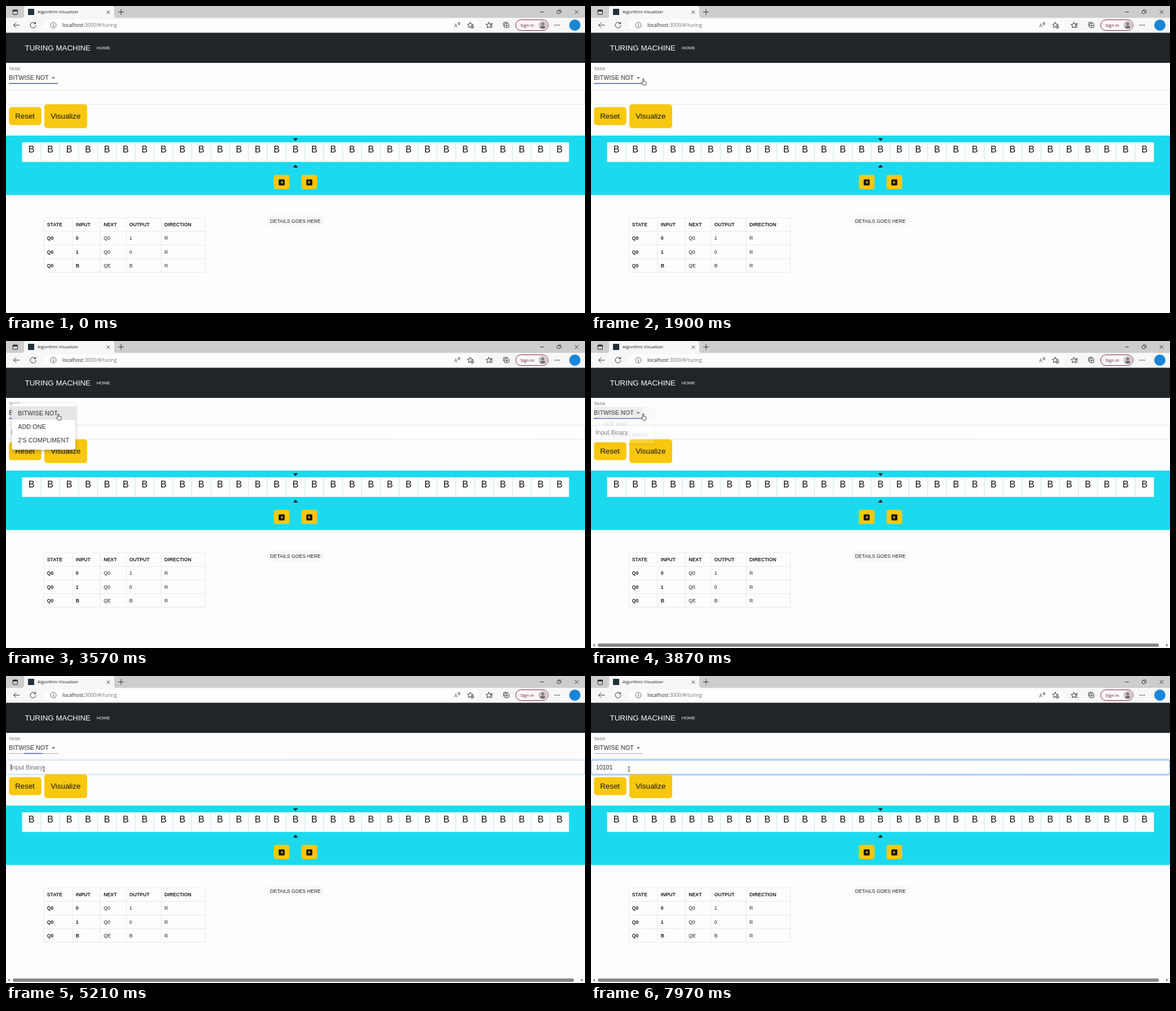
An HTML page that plays this animation: 1027 px wide and 545 px high, repeating every 8 s.

```html
<!DOCTYPE html>
<html lang="en">
<head>
<meta charset="utf-8">
<title>Turing machine</title>
<style>
  html, body { margin: 0; width: 100%; height: 100%; overflow: hidden; background: #fdfdfd; }
  svg { display: block; }
  text { font-family: "Liberation Sans", Arial, sans-serif; white-space: pre; }
  .ui { font-family: "Open Sans", "Noto Sans", sans-serif; }
  .icon { fill: none; stroke: #333; stroke-width: 1; stroke-linecap: round; stroke-linejoin: round; }
  .mui { letter-spacing: .1px; }
  #underline { transform-origin: 48.5px 137px; }
  #menu { transform-origin: 14px 122px; }
  #paper { filter: drop-shadow(0 3px 3px rgba(0, 0, 0, .25)); }
</style>
</head>
<body>
<svg id="stage" width="1027" height="545" viewBox="0 0 1027 545">
  <g id="chrome"></g>
  <g id="page"></g>
  <g id="scrollbar"></g>
  <g id="menu"></g>
  <g id="cursor">
    <path id="arrow" d="M0 0V10.4L2.5 8.2 4.1 11.6 5.6 10.9 4.1 7.6H7.2Z" fill="#fff" stroke="#222" stroke-width=".8"/>
    <path id="hand" d="M-1 1Q0-.6 1 1V5L4 5.5Q5.6 6 5.4 7.6L4.6 11.5H-.6L-3 7.6Q-3.2 6-1 7.2Z" fill="#fff" stroke="#222" stroke-width=".9" stroke-linejoin="round"/>
    <path id="beam" d="M-2-4H-.6L0-3.5 .6-4H2M0-3.5V3.5M-2 4H-.6L0 3.5 .6 4H2" fill="none" stroke="#222" stroke-width=".9"/>
  </g>
</svg>
<script>
const LOOP = 8000;
const INK = '#212529', YELLOW = '#f8c70f', CYAN = '#1bdaee';
const $ = id => document.getElementById(id);
let layer;

function add(tag, attrs, content = '') {
  const el = document.createElementNS('http://www.w3.org/2000/svg', tag);
  for (const key in attrs) el.setAttribute(key, attrs[key]);
  el.textContent = content;
  layer.appendChild(el);
  return el;
}
const rect = (x, y, width, height, fill, more) => add('rect', { x, y, width, height, fill, ...more });
const path = (d, more) => add('path', { d, ...more });
const icon = (d, more) => path(d, { class: 'icon', ...more });
const circle = (cx, cy, r, fill, more) => add('circle', { cx, cy, r, fill, ...more });
// Text is placed by its left edge and the middle of its capitals.
const label = (content, x, middle, size, fill = INK, more) =>
  add('text', { x, y: middle + size * .36, 'font-size': size, fill, ...more }, content);

function drawChrome() {
  layer = $('chrome');
  const ui = { class: 'ui' };
  rect(0, 0, 1027, 22, '#cdcdcd');
  rect(0, 21, 1027, 26.5, '#f7f7f7');
  path('M28 21Q32 21 32 17V4Q32 0 36 0H188Q192 0 192 4V17Q192 21 196 21Z', { fill: '#f7f7f7' });
  rect(12, 7, 8.5, 8, 'none', { rx: 1.5, stroke: '#222' });
  rect(12, 7, 8.5, 2.5, '#222');
  rect(39, 5, 11, 11, '#20323a');
  label('Algorithm Visualizer', 56, 10.5, 7.8, '#222', ui);
  icon('M179 8.5L184 13.5M184 8.5L179 13.5');
  icon('M199.5 10.5H208.5M204 6V15');
  icon('M947.5 10.5H953.5');
  rect(977.5, 8.5, 5, 5, 'none', { rx: 1, stroke: '#333' });
  icon('M979.5 7H983Q984.5 7 984.5 8.5V12');
  icon('M1009 7.5L1015 13.5M1015 7.5L1009 13.5');

  icon('M24 34H13.5M18 29.5L13.5 34 18 38.5');
  icon('M52 31A5 5 0 1 0 53 34.5M52.5 28.5V31.5H49.5');
  rect(67, 24, 773, 20, '#fefefe', { rx: 10 });
  circle(84, 34, 5, 'none', { stroke: '#555', 'stroke-width': .9 });
  icon('M84 33.5V36.5M84 31.5V31.6');
  const url = label('localhost', 100, 34, 8.9, '#222', ui);
  const rest = add('tspan', { fill: '#707070' }, ':3000/#/turing');
  url.appendChild(rest);
  label('A', 795, 34.5, 9, '#555', ui);
  icon('M802 29.5Q803.5 31 802 33M804 28.5Q806 31 804 34', { 'stroke-width': .8 });
  const star = 'l1.5 3.2 3.5.5-2.6 2.4.7 3.5-3.1-1.7-3.1 1.7.7-3.5-2.6-2.4 3.5-.5Z';
  icon('M823.5 28.8' + star);
  circle(827, 37, 2.8, '#fefefe', { stroke: '#333', 'stroke-width': .8 });
  icon('M825.8 37H828.2M827 35.8V38.2', { 'stroke-width': .7 });
  icon('M856.5 29' + star);
  icon('M860 31.5H863M861 34.5H863M860.5 37.5H863');
  rect(884.5, 31, 7.5, 7.5, '#f7f7f7', { rx: 1.5, class: 'icon' });
  icon('M882.5 36V30.5Q882.5 29 884 29H889.5M886.5 34.8H890M888.2 33V36.6');
  rect(904, 24.5, 57.5, 19, '#fbf8f9', { rx: 9.5, stroke: '#842743' });
  label('Sign in', 912.5, 34, 7.9, '#5e1c30', ui);
  circle(952, 34, 7.5, '#c9c5c3');
  circle(952, 31.8, 2.4, '#77716e');
  path('M947.5 38.5Q947.5 35 952 35T956.5 38.5Q952 41.5 947.5 38.5', { fill: '#77716e' });
  for (const x of [974, 977.5, 981]) circle(x, 34, .9, '#333');
  circle(1009, 34, 10, '#1a86d8');
}

function drawPage() {
  layer = $('page');
  rect(0, 47.5, 1027, 53.5, '#1f2529');
  label('TURING MACHINE', 33.5, 74, 13.37, '#fff');
  label('HOME', 160.8, 74.2, 8.02, '#f4f4f4');

  label('TASK', 5.2, 111.6, 8.02, '#6b6b6b', { class: 'mui' });
  rect(5.3, 117, 86.7, 21, '#efeff1', { id: 'focusFill', rx: 1 });
  label('BITWISE NOT', 5.3, 127.3, 10.7, '#2b2b2b', { class: 'mui' });
  path('M80.7 126.3H87.3L84 129.7Z', { fill: '#757575' });
  rect(5.3, 137.3, 86.7, .8, '#8f8f8f');
  rect(5.3, 136.8, 86.7, 1.4, '#3f51b5', { id: 'underline' });

  rect(.5, 149.5, 1026, 24.8, '#fefefe', { rx: 3.5, stroke: '#dee2e8', 'stroke-width': .9 });
  layer = add('g', { id: 'ring' });
  rect(-.9, 148, 1028.8, 27.8, 'none', { rx: 5, stroke: '#c2dbfe', 'stroke-width': 2.7 });
  rect(.5, 149.5, 1026, 24.8, 'none', { rx: 3.5, stroke: '#86b7fe' });
  layer = $('page');
  label('Input Binary', 8.5, 162, 10.7, '#646b72', { id: 'placeholder' });
  label('10101', 8.7, 162, 10.7, INK, { id: 'typed' });
  rect(8.4, 156.5, .9, 11, '#111', { id: 'caretStart' });
  rect(38.6, 156.5, .9, 11, '#111', { id: 'caretEnd' });

  rect(5.3, 179.5, 57.4, 32, YELLOW, { rx: 5 });
  label('Reset', 16.2, 195.5, 13.37, '#111');
  rect(68, 174.5, 76, 42.3, YELLOW, { rx: 5 });
  label('Visualize', 79.2, 195.5, 13.37, '#111');

  drawTape();
  drawTable();
  rect(463, 372, 101, 20, '#f7f8f9', { rx: 6 });
  label('DETAILS GOES HERE', 468.6, 382.2, 8.69);
}

function drawTape() {
  const count = 29, left = 28.5, step = 33.45;
  rect(0, 230, 1027, 105.5, CYAN);
  rect(left, 242, count * step, 34.8, '#fdfdfd');
  for (let i = 0; i < count; i++) {
    if (i) rect(left + i * step - .4, 242, .8, 34.8, '#b9dfe6');
    label('B', left + (i + .5) * step, 254.6, 16.05, '#111', { 'text-anchor': 'middle' });
  }
  path('M509 234.8H518L513.5 239.8Z', { fill: INK });
  path('M509 286.8H518L513.5 281.4Z', { fill: INK });
  for (const [x, side] of [[489, -1], [538, 1]]) {
    rect(x - 14, 299.7, 28, 25.3, YELLOW, { rx: 4 });
    rect(x - 5.3, 307.8, 10.6, 10.6, '#111', { rx: 1.5 });
    path(`M${x + side * 2} 313.1L${x - side * 1.6} 310.4V315.8Z`, { fill: YELLOW });
  }
}

function drawTable() {
  const columns = [67, 118, 167.5, 213, 275.3, 353.5];
  const rows = ['STATE INPUT NEXT OUTPUT DIRECTION', 'Q0 0 Q0 1 R', 'Q0 1 Q0 0 R', 'Q0 B QE B R'];
  const top = 376, height = 24.15, bottom = top + rows.length * height;
  for (const x of columns) rect(x - .4, top, .8, bottom - top, '#e1e3e5');
  for (let r = 0; r <= rows.length; r++) rect(67, top + r * height - .4, 286.5, .8, '#e1e3e5');
  rows.forEach((row, r) => row.split(' ').forEach((cell, c) =>
    label(cell, columns[c] + 5.8, top + (r + .5) * height, 8.69, '#1d2023',
      { 'font-weight': r && c > 1 ? 400 : 700 })));
}

function drawScrollbar() {
  layer = $('scrollbar');
  rect(12, 537, 995.5, 6, '#868686', { rx: 3 });
  path('M7 537.2V542.8L3 540Z', { fill: '#868686' });
  path('M1020 537.2V542.8L1024 540Z', { fill: '#868686' });
}

function drawMenu() {
  layer = $('menu');
  rect(10.5, 111, 112.5, 82, '#fff', { id: 'paper', rx: 2.7 });
  rect(10.5, 116, 112.5, 24, '#e6e6e6');
  ['BITWISE NOT', 'ADD ONE', "2'S COMPLIMENT"].forEach((item, i) =>
    label(item, 21.3, 128.2 + i * 24, 10.7, '#2b2b2b', { class: 'mui' }));
}

// Steps are [time, value, easing towards the next step]; values hold at both ends.
function play(id, property, steps) {
  const frames = steps.map(([time, value, easing = 'linear']) =>
    ({ offset: time / LOOP, [property]: value, easing }));
  frames.unshift({ ...frames[0], offset: 0, easing: 'linear' });
  frames.push({ ...frames[frames.length - 1], offset: 1 });
  $(id).animate(frames, { duration: LOOP, iterations: Infinity });
}
// Visible only within the given [from, to] spans.
function show(id, ...spans) {
  const steps = [[0, 0, 'step-end']];
  for (const [from, to] of spans) steps.push([from, 1, 'step-end'], [to, 0, 'step-end']);
  play(id, 'opacity', steps);
}

drawChrome();
drawPage();
drawScrollbar();
drawMenu();

const STANDARD = 'cubic-bezier(.4, 0, .2, 1)';
const OPEN = 2470, CLOSE = 3736, FOCUS = 5155, TYPE = 6140;
const GROW = 251, SCALE = 167;
const SMALL = 'scale(.75, .5625)', FULL = 'scale(1, 1)';

play('menu', 'opacity', [[OPEN, 0, STANDARD], [OPEN + GROW, 1], [CLOSE, 1, STANDARD], [CLOSE + GROW, 0]]);
play('menu', 'transform', [[OPEN, SMALL, STANDARD], [OPEN + SCALE, FULL],
  [CLOSE + GROW - SCALE, FULL, STANDARD], [CLOSE + GROW, SMALL]]);
show('scrollbar', [0, OPEN], [CLOSE, LOOP]);

show('focusFill', [0, FOCUS]);
play('underline', 'transform', [[FOCUS, 'scaleX(1)', 'cubic-bezier(0, 0, .2, 1)'], [FOCUS + 200, 'scaleX(0)']]);
play('ring', 'opacity', [[FOCUS, 0, 'ease-in-out'], [FOCUS + 150, 1]]);
show('placeholder', [0, TYPE]);
show('typed', [TYPE, LOOP]);
show('caretStart', [FOCUS, 5570]);
show('caretEnd', [TYPE, 6640], [7170, 7710]);

const at = (x, y) => `translate(${x}px, ${y}px)`;
play('cursor', 'transform', [[830, at(204, 125.5), 'ease-in-out'], [1400, at(92.8, 128.8)],
  [4640, at(92.8, 128.8), 'ease-in-out'], [5040, at(67.2, 165.2)]]);
show('arrow', [0, 1370], [4780, 4850]);
show('hand', [1370, 4780]);
show('beam', [4850, LOOP]);
</script>
</body>
</html>
```
